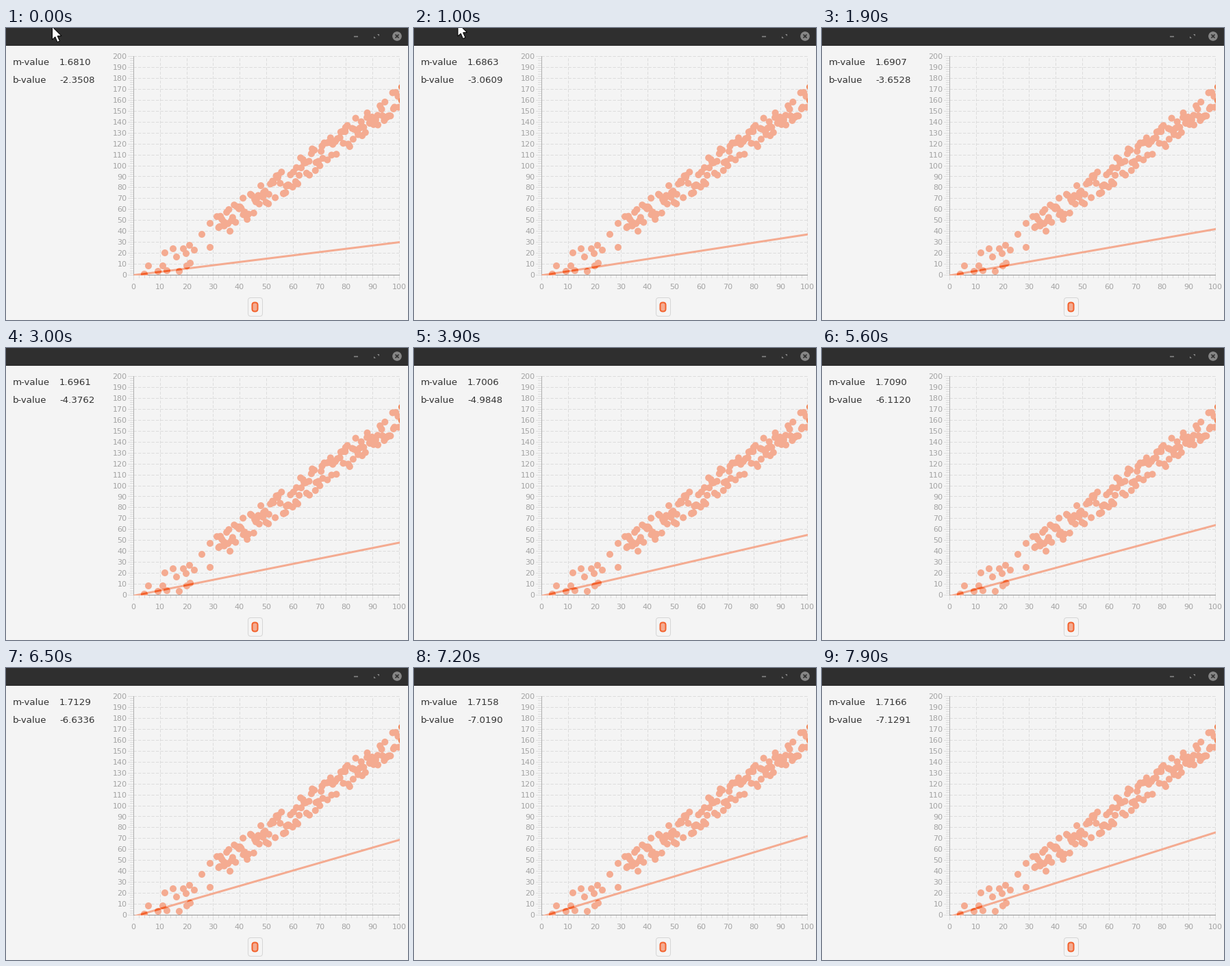
These frames come from a looping animation (587x426 px, 8000 ms). A matplotlib script:

```python
import numpy as np
import matplotlib.pyplot as plt
from matplotlib.animation import FuncAnimation
from matplotlib.patches import Circle, FancyBboxPatch, PathPatch, Polygon, Rectangle
from matplotlib.path import Path
from matplotlib.transforms import Bbox, TransformedBbox

W, H, PT = 587, 426, 0.72            # stage size, points per pixel
LEFT, RIGHT, TOP, BASE = 186.5, 574.5, 41.5, 360.5
BG, LIGHT, DARK = "#f4f4f4", "#f4ab91", "#f3622d"
BAR, ICON = "#2f2f2f", "#868686"
GRID, LABEL, INK = "#dcdcdc", "#a3a3a3", "#333333"
TICK_SIZE, TEXT_SIZE = 11.1, 13.33

plt.rcParams["font.family"] = "DejaVu Sans"
fig = plt.figure(figsize=(W / 100, H / 100), dpi=100, facecolor=BG)
ax = fig.add_axes([0, 0, 1, 1])
ax.set_xlim(0, W)
ax.set_ylim(H, 0)
ax.axis("off")
plot_box = TransformedBbox(Bbox([[186, 41], [575, 361]]), ax.transData)


def px(x):
    return LEFT + (RIGHT - LEFT) * x / 100


def py(y):
    return BASE - (BASE - TOP) * y / 200


def mid(v):
    """Centre of the pixel that holds v."""
    return np.floor(v) + 0.5


def stroke(xs, ys, color, width=1, z=1, **kw):
    kw.setdefault("solid_capstyle", "butt")
    return ax.plot(xs, ys, color=color, lw=width * PT, zorder=z, snap=False, **kw)[0]


def label(x, y, s, size, color, ha="left"):
    return ax.text(x, y, s, fontsize=size * PT, color=color, ha=ha,
                   va="baseline", zorder=6)


# Title bar and window buttons
ax.add_patch(Rectangle((0, 0), W, 26, fc=BAR, lw=0, zorder=5))
stroke([508, 514], [12.5, 12.5], ICON, 1.6, 6)
ax.add_patch(Circle((571, 12), 6.8, fc=ICON, lw=0, zorder=6))
for s in (-1, 1):
    corner = np.array([(0.6, -3), (3.6, -3), (3.6, 0)]) * s
    ax.add_patch(Polygon(corner + (541, 12.3), fc=ICON, lw=0, zorder=6))
    stroke([568.5, 573.5], [12 - 2.5 * s, 12 + 2.5 * s], BAR, 1.6, 7)

# Grid, ticks and axes
dash = dict(dashes=(4.25, 2.25), dash_capstyle="butt")
for k in range(0, 101, 2):
    x, major = mid(px(k)), k % 10 == 0
    stroke([x, x], [361, 368 if major else 365], GRID)
    if major:
        stroke([x, x], [BASE, TOP], GRID, **dash)
        label(x - 0.5, 381, str(k), TICK_SIZE, LABEL, "center")
for k in range(0, 201, 2):
    y, major = mid(py(k)), k % 10 == 0
    stroke([178 if major else 181, 186], [y, y], GRID)
    if major:
        stroke([LEFT, RIGHT], [y, y], GRID, **dash)
        label(176.5, py(k) + 3.6, str(k), TICK_SIZE, LABEL, "right")
stroke([LEFT, LEFT], [41, 361], "#b0b0b0", z=2)
stroke([186, 575], [BASE, BASE], "#969696", z=2)

# Scatter: a few sparse dots at the foot, then a noisy linear band
dots = [(202, 359), (208, 347), (222, 355), (229, 347), (235, 354), (232, 328),
        (244, 322), (249, 334), (253, 355), (259, 322), (263, 329), (268, 317),
        (275, 324), (264, 347), (269, 343), (286, 301), (298, 285), (298, 320)]
rng = np.random.default_rng(7)
n = 136
xs = 31 + 69 * (np.arange(n) + rng.random(n)) / n
ys = 1.74 * xs - 12.5 + rng.uniform(-12, 12, n)
dots += list(zip(px(xs), py(ys)))

unit = Path.unit_circle()
cloud = Path.make_compound_path(*[Path(unit.vertices * 5 + d, unit.codes) for d in dots])
scatter = ax.add_patch(PathPatch(cloud, fc=LIGHT, lw=0, zorder=3))
scatter.set_clip_box(plot_box)
for y in (86, 106):
    edge = ax.add_patch(Circle((578, y), 5, fc="#ee8050", lw=0, zorder=3))
    edge.set_clip_box(plot_box)

# Fitted line, darker where it crosses the dots
fit = stroke([], [], LIGHT, 3, 3)
cross = stroke([], [], DARK, 3, 4)
cross.set_clip_path(cloud, ax.transData)
for ln in (fit, cross):
    ln.set_clip_box(plot_box)

# Legend
for x, y, w, h, r, fc, ec, lw in ((353.5, 393.5, 21, 27, 4, BG, "#d6d6d6", 1),
                                  (359.5, 400.5, 8, 13, 3.6, LIGHT, DARK, 2)):
    ax.add_patch(FancyBboxPatch((x, y), w, h, fc=fc, ec=ec, lw=lw * PT, zorder=3,
                                boxstyle=f"round,pad=0,rounding_size={r}"))

# Readouts
label(10, 54, "m-value", TEXT_SIZE, INK)
label(10, 80, "b-value", TEXT_SIZE, INK)
m_text = label(78, 54, "", TEXT_SIZE, INK)
b_text = label(78, 80, "", TEXT_SIZE, INK)

# Mouse pointer
arrow = np.array([(0, 0), (0, 19), (4.3, 15), (7.5, 22.5),
                  (11, 21), (7.7, 13.7), (13.5, 13.5)])
pointer = ax.add_patch(Polygon(arrow, fc="white", ec="black", lw=PT, zorder=9))

KEYS = [0, 1000, 3000, 3900, 5600, 6500]
B = [-2.3508, -3.0609, -4.3762, -4.9848, -6.1120, -6.6336, -7.1291]
LINE_END = [30.1, 37.2, 48, 55, 64, 68.8, 75.6]


def draw(i):
    t = i * 100
    if 2400 < t < 3000:              # updates stall here
        t = 2400
    b = np.interp(t, KEYS + [7400], B)
    m = 1.68097 - 0.00746 * (b - B[0])
    m_text.set_text(f"{m:.4f}")
    b_text.set_text(f"{b:.4f}")
    end = np.interp(t, KEYS + [7900], LINE_END)
    start = -1.5 * t / 7900
    for ln in (fit, cross):
        ln.set_data([px(0), px(101)], [py(start), py(start + (end - start) * 1.01)])
    x = np.interp(t, [0, 1000], [67.5, 64])
    y = np.interp(t, [0, 1000, 1800], [-2, -7, -26])
    pointer.set_xy(arrow + (x, y))
    return m_text, b_text, fit, cross, pointer


anim = FuncAnimation(fig, draw, frames=80, interval=100, repeat=True,
                     repeat_delay=0, blit=False)
plt.show()
```
